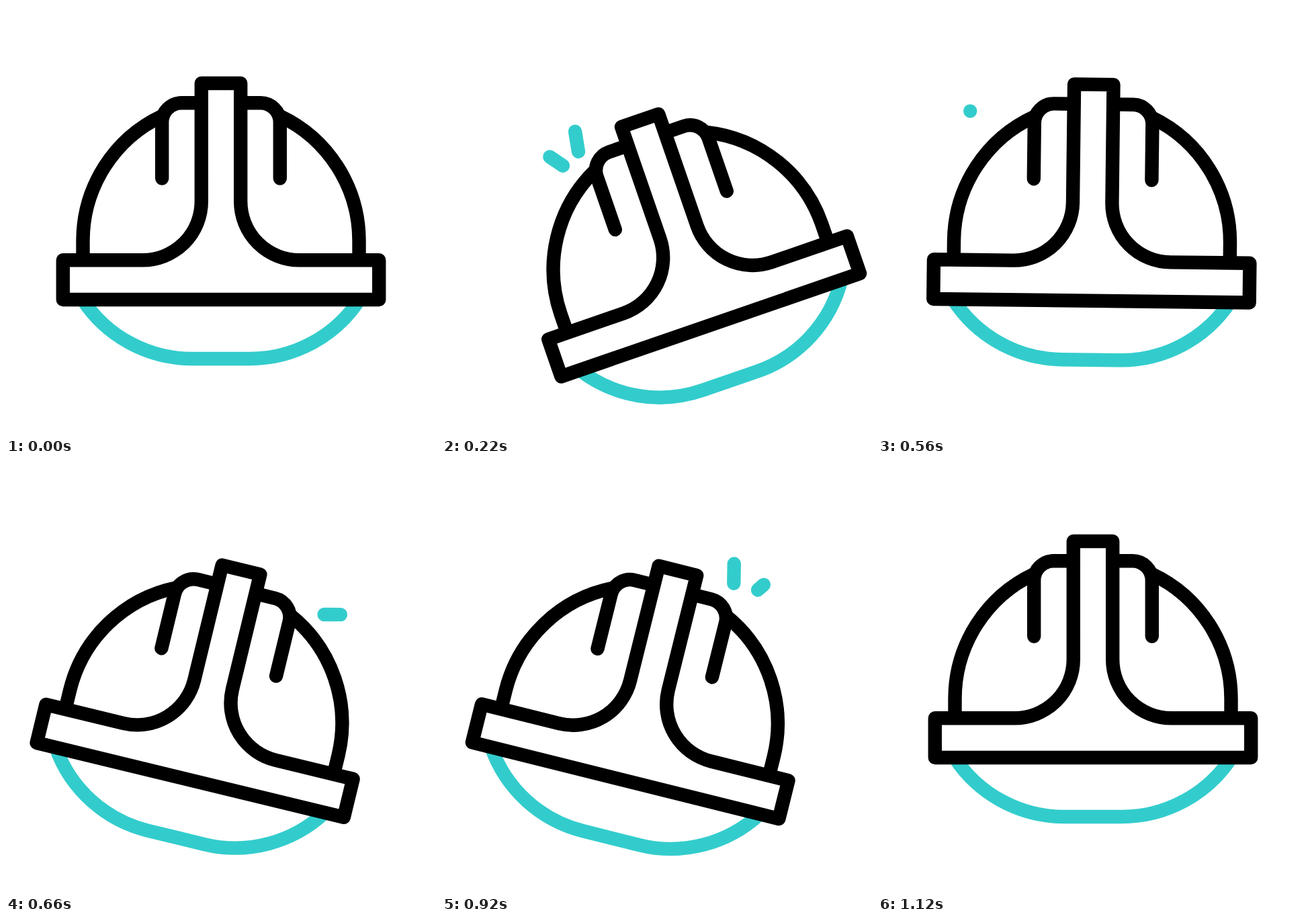
These frames come from a looping animation (640 px wide and 640 px high, 1.4 s). An HTML page:

```html
<!DOCTYPE html>
<html lang="en">
<head>
<meta charset="utf-8">
<title>Rocking helmet</title>
<style>
  html, body { margin: 0; width: 100%; height: 100%; overflow: hidden; background: #fff; }
  svg { display: block; width: 100%; height: 100%; }
</style>
</head>
<body>
<svg viewBox="0 0 640 640" fill="none" stroke-width="20.4" stroke-linecap="round" stroke-linejoin="round">
  <g id="helmet" stroke="#000">
    <path stroke="#33cccc" stroke-linecap="butt" d="M114 437A195 195 0 0 0 277 525H363A195 195 0 0 0 526 437"/>
    <path d="M114.5 378V349A205.5 205.5 0 0 1 232.3 163.7M525.5 378V349A205.5 205.5 0 0 0 407.7 163.7"/>
    <path d="M232.2 256.5V173.5A29 29 0 0 1 261 144.3H291M407.8 256.5V173.5A29 29 0 0 0 379 144.3H349"/>
    <path fill="#fff" d="M290.8 115H349.2V291A87.5 87.5 0 0 0 436.7 378.3H555.2V437H84.8V378.3H203.3A87.5 87.5 0 0 0 290.8 291Z"/>
    <g id="sparks" stroke="#33cccc"></g>
  </g>
</svg>
<script>
const LOOP = 1400, STEP = 20, HALF = 540;
const helmet = document.getElementById('helmet');
const sparkLayer = document.getElementById('sparks');

// px, py: linear and quadratic drift of the helmet's middle per degree of tilt
const swings = [
  { from: 0, top: 249, to: 535, dir: -1, max: 19.7, px: [1.759, -0.0175], py: [1.744, 0.0368] },
  { from: 535, top: 774, to: 1086, dir: 1, max: 25.4, px: [-0.925, 0.0253], py: [2.543, 0.0178] }
];

// Inner end, outer end, in the order they flash
const sparks = [
  [[218.3, 129], [223.4, 99]],
  [[189.7, 141.2], [172.3, 118.2]],
  [[165, 161], [136.4, 156.8]],
  [[455.8, 150.6], [484.6, 143.8]],
  [[432.4, 129], [449.2, 104.3]],
  [[405.5, 113.2], [398.9, 84.8]]
].map(([inner, outer], i) => {
  const el = document.createElementNS('http://www.w3.org/2000/svg', 'path');
  sparkLayer.appendChild(el);
  return { el, inner, outer, start: 30 + (i % 3) * 100 + (i > 2 ? HALF : 0) };
});

const clamp = u => Math.min(1, Math.max(0, u));
const easeInOut = u => (1 - Math.cos(Math.PI * clamp(u))) / 2;
const easeOut = u => 1 - Math.pow(1 - clamp(u), 1.5);
const mix = (a, b, u) => a.map((v, i) => v + (b[i] - v) * u);

function drawHelmet(t) {
  const s = t < swings[0].to ? swings[0] : swings[1];
  const u = t < s.top ? (t - s.from) / (s.top - s.from) : (s.to - t) / (s.to - s.top);
  const a = s.max * easeInOut(u);
  const drift = ([p, q]) => a * (p + q * a);
  helmet.setAttribute('transform',
    `translate(${drift(s.px)} ${drift(s.py)}) rotate(${s.dir * a} 320 276)`);
}

function drawSpark({ el, inner, outer, start }, t) {
  const age = t - start;
  const visible = age > 0 && age < 340;
  el.style.display = visible ? '' : 'none';
  if (!visible) return;
  const head = mix(inner, outer, easeOut(age / 132));
  const tail = mix(inner, outer, easeOut((age - 190) / 130));
  el.setAttribute('d', `M${tail}L${head[0] + 0.01} ${head[1]}`);
}

function draw(now) {
  const t = Math.floor((now % LOOP) / STEP) * STEP;
  drawHelmet(t);
  sparks.forEach(s => drawSpark(s, t));
}

let begin;
function tick(now) {
  begin ??= now;
  draw(Math.max(0, now - begin));
  requestAnimationFrame(tick);
}
draw(0);
requestAnimationFrame(tick);
</script>
</body>
</html>
```
